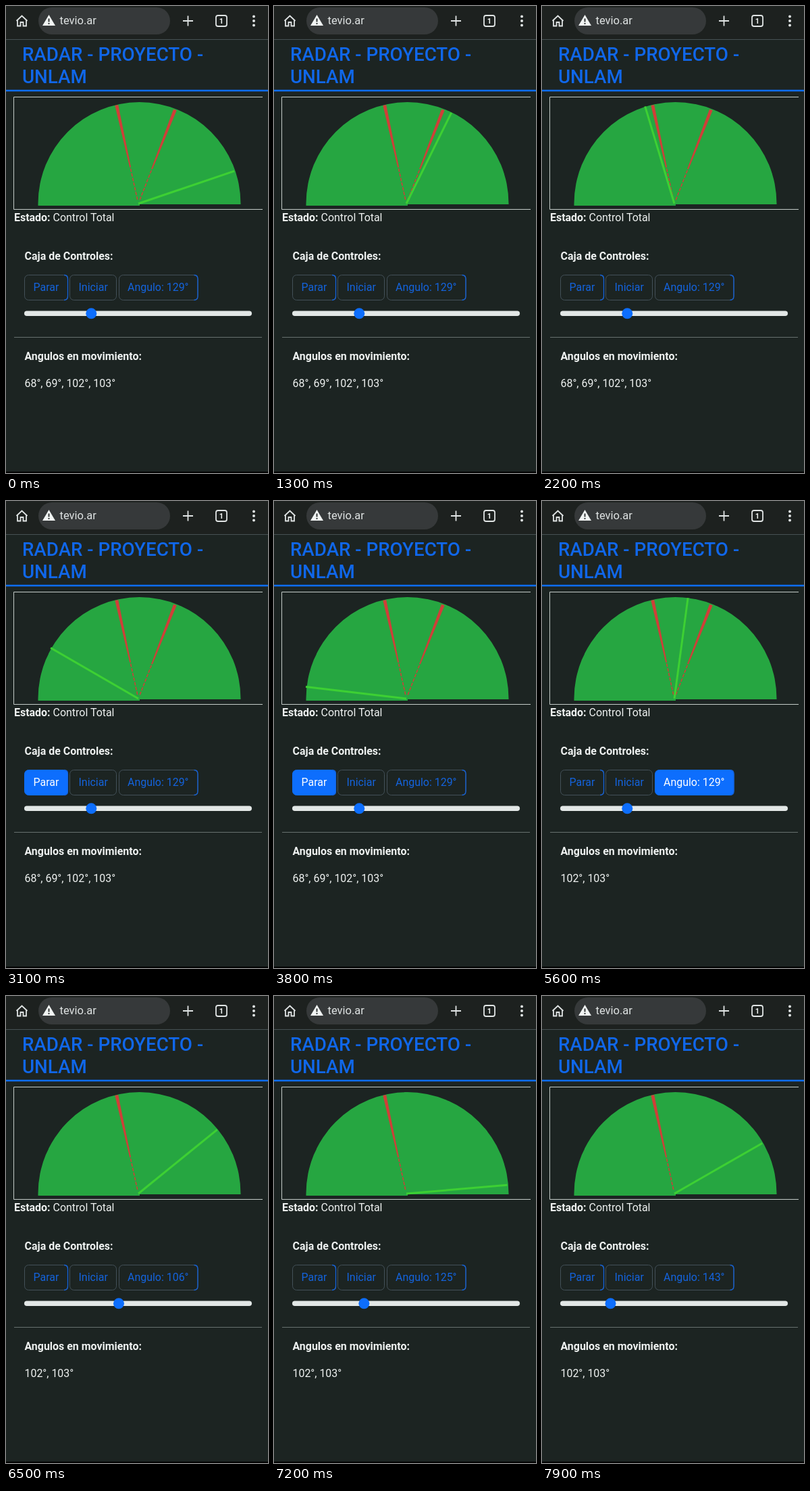
An HTML page that plays this animation: 388 by 690 pixels, repeating every 8000 ms.

```html
<!DOCTYPE html>
<html lang="es">
<head>
<meta charset="utf-8">
<title>Radar</title>
<style>
  html, body { margin: 0; width: 100%; height: 100%; overflow: hidden; background: #1c2422; }
  svg { display: block; width: 388px; height: 690px; }
  text { font: 15.95px Roboto, sans-serif; fill: #eef1f0; white-space: pre; }
  .bold { font-weight: 700; }
  .title { font-size: 27.75px; font-weight: 500; fill: #1067ea; }
  .url { font-size: 16.5px; fill: #dfe3e3; }
  .tab { font-size: 11px; font-weight: 700; text-anchor: middle; }
  .icon { fill: none; stroke: #e0e4e4; stroke-width: 1.8; }
  .btn rect { fill: none; stroke: #435058; }
  .btn path { fill: none; stroke: #1463dc; stroke-width: 1.3; }
  .btn text { fill: #1463dc; }
  .btn.on rect { fill: #0d6efd; stroke: #0d6efd; }
  .btn.on text { fill: #fff; }
  .echo { fill: #cf3f38; stroke: #cf3f38; }
</style>
</head>
<body>
<svg viewBox="0 0 388 690">
  <rect width="388" height="690" fill="#1c2422"/>
  <rect y="688" width="388" height="2" fill="#000"/>

  <!-- browser bar -->
  <rect width="388" height="49" fill="#1d211f"/>
  <rect x="48" y="2" width="195" height="40" rx="20" fill="#36393a"/>
  <path class="icon" d="M17 21V29.500H21.500V24H25.500V29.500H30V21M15.500 22L23.500 14.500L31.500 22"/>
  <path d="M63.5 13L73 29H54Z" fill="#f1f4f3"/>
  <path d="M63.5 18.5V23.5M63.5 25V27" stroke="#36393a" stroke-width="2"/>
  <text class="url" x="79.500" y="27">tevio.ar</text>
  <path class="icon" d="M262 22H277M269.500 14.500V29.500"/>
  <rect class="icon" x="311" y="14" width="16" height="16" rx="3"/>
  <text class="tab" x="319" y="26">1</text>
  <path d="M367 15.500h0M367 22h0M367 28.500h0" stroke="#e0e4e4" stroke-width="4" stroke-linecap="round"/>
  <path d="M0 49.500H388" stroke="#465154"/>

  <text class="title" x="24" y="80.500">RADAR - PROYECTO -</text>
  <text class="title" x="24" y="113.500">UNLAM</text>
  <path d="M0 125H388" stroke="#0d6efd" stroke-width="2.500"/>

  <!-- radar -->
  <path d="M380 134.500H11.500V300.500H380" fill="none" stroke="#c3cbc8"/>
  <path d="M47.500 295V292A150 150 0 0 1 347.500 292V293H198V295Z" fill="#26a641"/>
  <g id="echoes"></g>
  <path id="beam" stroke="#3dd033" stroke-width="3"/>

  <text x="12" y="318"><tspan class="bold">Estado:</tspan> Control Total</text>
  <text class="bold" x="27.500" y="375">Caja de Controles:</text>
  <g class="btn" id="stop">
    <rect x="27.500" y="397.500" width="64" height="37" rx="6"/>
    <path d="M86 397.500Q91.500 397.500 91.500 403V429Q91.500 434.500 86 434.500"/>
    <text x="40.500" y="421">Parar</text>
  </g>
  <g class="btn">
    <rect x="94.500" y="397.500" width="69" height="37" rx="6"/>
    <text x="107.500" y="421">Iniciar</text>
  </g>
  <g class="btn" id="angle">
    <rect x="167.500" y="397.500" width="116.500" height="37" rx="6"/>
    <path d="M278.500 397.500Q284 397.500 284 403V429Q284 434.500 278.500 434.500"/>
    <text id="value" x="180" y="421"></text>
  </g>
  <rect x="27" y="450.500" width="337" height="7.500" rx="3.750" fill="#e2e7e6"/>
  <circle id="thumb" cy="454.300" r="8" fill="#0d6efd"/>

  <path d="M12 489.500H379" stroke="#66706e"/>
  <text class="bold" x="27.500" y="523">Angulos en movimiento:</text>
  <text id="list" x="27.500" y="563"></text>
</svg>
<script>
const LOOP = 8000, STEP = 100, CX = 196, CY = 292, R = 150;
const $ = id => document.getElementById(id);

// [seconds, value] keys, linear in between
const sweep = [[0, 18.7], [.3, 18.7], [1.3, 63.6], [3.1, 150], [3.67, 180],
  [4.5, 137], [5.6, 82.3], [6.5, 39], [7.3, 0], [7.9, 29.8], [8, 34.6]];
const dial = [[0, 129], [6, 129], [6.4, 106], [6.8, 106], [7.6, 143], [8, 143]];

function at(keys, t) {
  const i = Math.max(1, keys.findIndex(k => k[0] >= t));
  const [t0, a] = keys[i - 1], [t1, b] = keys[i];
  return a + (b - a) * (t - t0) / (t1 - t0);
}

function polar(deg, r) {
  const a = deg * Math.PI / 180;
  return (CX + r * Math.cos(a)).toFixed(2) + ' ' + (CY - r * Math.sin(a)).toFixed(2);
}

// a wedge that thins into dashes towards the centre
function echo(id, deg) {
  const from = deg - .95, to = deg + .95;
  return `<g id="${id}" class="echo">
    <path stroke="none" d="M${polar(from, 55)}L${polar(from, R - 1)}L${polar(to, R - 1)}L${polar(to, 55)}Z"/>
    <path stroke-width="1.5" stroke-dasharray="5 2" d="M${polar(deg, 6)}L${polar(deg, 56)}"/></g>`;
}
$('echoes').innerHTML = echo('right', 68.6) + echo('left', 102.5);

function draw(t) {
  const value = Math.round(at(dial, t));
  $('beam').setAttribute('d', `M${CX} ${CY}L${polar(at(sweep, t), R)}`);
  $('right').style.display = t < 5.9 ? '' : 'none';
  $('stop').classList.toggle('on', t >= 2.6 && t < 4.2);
  $('angle').classList.toggle('on', t >= 4.2 && t < 6);
  $('value').textContent = `Angulo: ${value}°`;
  $('thumb').setAttribute('cx', 36 + (180 - value) * 1.77);
  $('list').textContent = (t < 3.9 ? '68°, 69°, ' : '') + '102°, 103°';
}

function tick() {
  const ms = performance.now() % LOOP;
  draw(Math.floor(ms / STEP) * STEP / 1000);
  requestAnimationFrame(tick);
}
tick();
</script>
</body>
</html>
```
